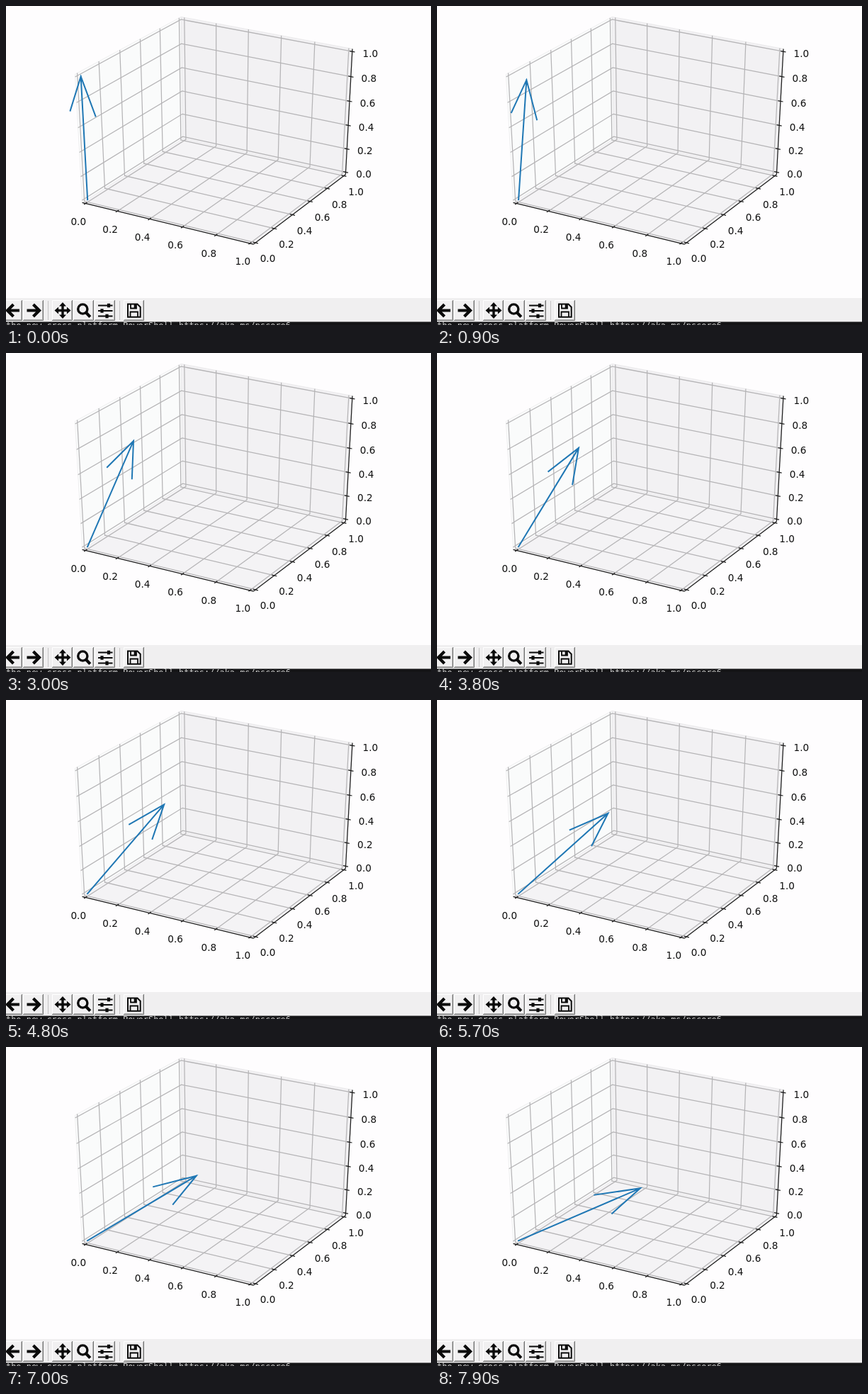
These frames come from a looping animation (600x450 px, 8000 ms). An HTML page:

```html
<!DOCTYPE html>
<html lang="en">
<head>
<meta charset="utf-8">
<title>Rotating 3D vector</title>
<style>
  html, body { margin: 0; width: 100%; height: 100%; overflow: hidden; background: #fefdfe; }
  svg { display: block; width: 600px; height: 450px; }
  .label { font: 13.6px "DejaVu Sans", sans-serif; text-anchor: middle; fill: #111; }
  .console { font: 11.93px "DejaVu Sans Mono", monospace; fill: #ccc; }
  .grid { fill: none; stroke: #b5b4b6; stroke-width: 1.25; }
  .axis { fill: none; stroke: #1c1c1c; stroke-width: 1.25; }
  .arrow { fill: none; stroke: #1f77b4; stroke-width: 2; stroke-linecap: square; }
  .icon { fill: none; stroke: #0a0a0a; }
</style>
</head>
<body>
<svg viewBox="0 0 600 450">
  <g id="plot"></g>
  <path id="arrow" class="arrow"/>
  <rect y="412" width="600" height="34" fill="#f0eff0"/>
  <g id="buttons"></g>
  <g class="icon" stroke-width="4.2">
    <path d="M19 429.5H3M10.500 421L2 429.5L10.500 438"/>
    <path d="M29.500 429.5H46M38.500 421L47 429.5L38.500 438"/>
    <path d="M80 422V437M72.500 429.500H87.500" stroke-width="3.4"/>
    <path d="M80 418L85 423.600H75ZM80 441L85 435.400H75ZM68.500 429.500L74.100 424.500V434.500ZM91.500 429.500L85.900 424.500V434.500Z" fill="#0a0a0a" stroke="none"/>
    <circle cx="108.300" cy="427.500" r="6.600" stroke-width="3.400"/>
    <path d="M113 432.500L118.800 438.600"/>
    <path d="M130 422.500H150.500M130 430H150.500M130 437.500H150.500" stroke-width="2.2"/>
    <path d="M145 419.700V425.300M135.500 427.200V432.800M142.500 434.700V440.300"/>
    <path d="M172 420.500H185.500L189.700 424.700V438.700H172Z" stroke-width="2"/>
    <path d="M176 421V426.500H184V421M175.500 438V431.500H186V438" stroke-width="1.800"/>
    <path d="M182 421V426" stroke-width="2.600"/>
  </g>
  <rect y="445.500" width="600" height="4.500" fill="#141416"/>
  <text class="console" x="0" y="454.500">the new cross-platform PowerShell https://aka.ms/pscore6</text>
</svg>
<script>
const NS = "http://www.w3.org/2000/svg";
const plot = document.getElementById("plot");
const buttons = document.getElementById("buttons");
const arrow = document.getElementById("arrow");

function add(parent, tag, attrs, text) {
  const el = document.createElementNS(NS, tag);
  for (const key in attrs) el.setAttribute(key, attrs[key]);
  if (text) el.textContent = text;
  parent.appendChild(el);
}

// Perspective camera: elevation 30°, azimuth -60°, distance 10
function project([x, y, z]) {
  x -= 0.5; y -= 0.5; z -= 0.5;
  const right = 0.866 * x + 0.5 * y;
  const up = -0.25 * x + 0.433 * y + 0.866 * z;
  const depth = 10 - (0.433 * x - 0.75 * y + 0.5 * z);
  return [296.5 + 2680 * right / depth, 170 - 1985 * up / depth];
}

const toPath = (...pts) => "M" + pts.map(p => project(p).map(v => v.toFixed(2)).join(" ")).join("L");
const line = (cls, ...pts) => add(plot, "path", { class: cls, d: toPath(...pts) });
const pane = (fill, stroke, ...pts) => add(plot, "path", { fill, stroke, d: toPath(...pts) + "Z" });

const lo = -1 / 48, hi = 1 + 1 / 48, tick = 0.015;
const values = [0, 0.2, 0.4, 0.6, 0.8, 1];

pane("#fafbfb", "#f0f0f1", [lo, lo, lo], [lo, hi, lo], [lo, hi, hi], [lo, lo, hi]);
pane("#f2f1f3", "#ebeaec", [lo, hi, lo], [hi, hi, lo], [hi, hi, hi], [lo, hi, hi]);
pane("#f4f3f5", "#edecee", [lo, lo, lo], [hi, lo, lo], [hi, hi, lo], [lo, hi, lo]);

for (const t of values) {
  line("grid", [t, lo, lo], [t, hi, lo], [t, hi, hi]);
  line("grid", [hi, t, lo], [lo, t, lo], [lo, t, hi]);
  line("grid", [lo, lo, t], [lo, hi, t], [hi, hi, t]);
}

// Each axis: point at a value, tick direction, label offset in pixels
const axes = [
  { point: t => [t, lo, lo], dir: [0, 1, 0], offset: [-10, 25.6] },
  { point: t => [hi, t, lo], dir: [1, 0, 0], offset: [17.2, 22.4] },
  { point: t => [hi, hi, t], dir: [1, 0, 0], offset: [25.5, 2.4] }
];
for (const { point, dir, offset } of axes) {
  line("axis", point(lo), point(hi));
  for (const t of values) {
    const p = point(t), shift = s => p.map((v, i) => v + s * dir[i]);
    line("axis", shift(-tick), shift(tick));
    const [x, y] = project(p);
    add(plot, "text", { class: "label", x: x + offset[0], y: y + offset[1] + 5 }, t.toFixed(1));
  }
}

for (const x of [-6, 24, 65, 95, 125, 166]) {
  add(buttons, "rect", { x, y: 415, width: 29, height: 29, fill: "#f1f0f1" });
  add(buttons, "path", { d: `M${x + 0.5} 443V415.500H${x + 28}`, fill: "none", stroke: "#fff" });
  add(buttons, "path", { d: `M${x} 443.500H${x + 28.5}V415`, fill: "none", stroke: "#777" });
  add(buttons, "path", { d: `M${x + 1} 442.500H${x + 27.5}V416`, fill: "none", stroke: "#b5b5b5" });
}
for (const x of [59.5, 160.5]) add(buttons, "path", { d: `M${x} 416V443`, stroke: "#c4c3c4" });

// The unit vector tilts from the z axis towards the x axis in small equal steps
const rad = Math.PI / 180;
const stepAngle = 1.0125 * rad, stepsPerSecond = 6.04, firstStep = 0.4;
const headLength = 0.3, headAngle = 15 * rad;
const unit = a => [Math.sin(a), 0, Math.cos(a)];

function draw() {
  const seconds = Math.floor(performance.now() % 8000 / 100) / 10;
  const angle = Math.floor(firstStep + stepsPerSecond * seconds) * stepAngle;
  const tip = unit(angle);
  const barb = side => unit(angle + side * headAngle).map((v, i) => tip[i] - headLength * v);
  arrow.setAttribute("d", toPath([0, 0, 0], tip) + toPath(barb(1), tip, barb(-1)));
  requestAnimationFrame(draw);
}
draw();
</script>
</body>
</html>
```
